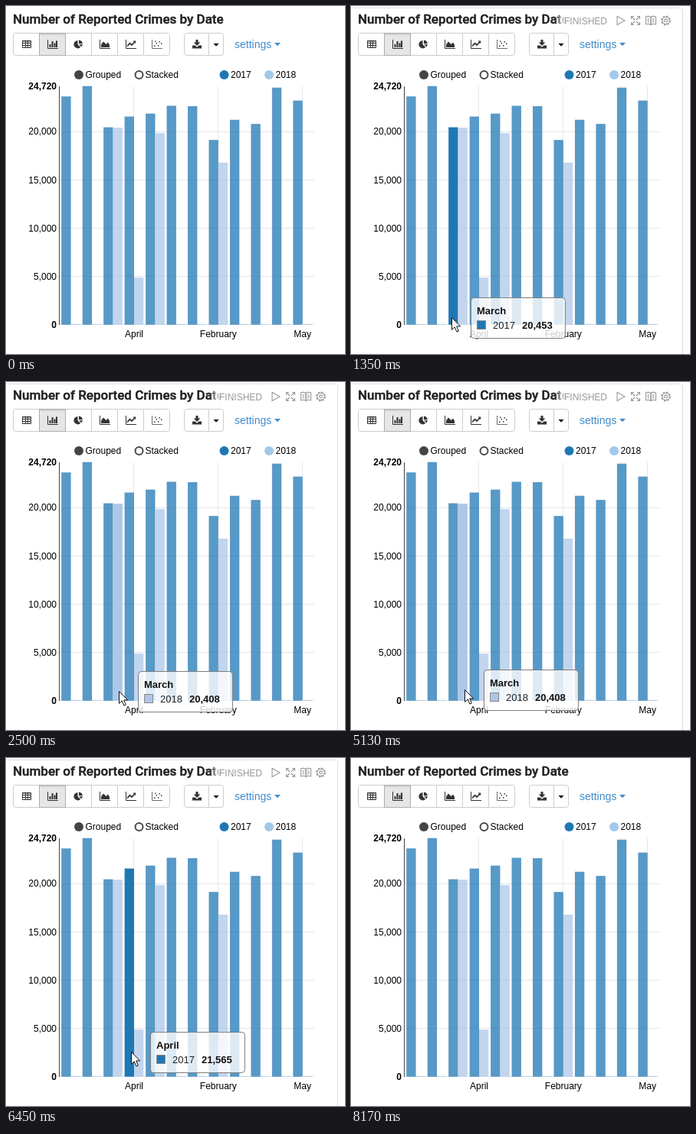
Recreate the animation shown at these times as an HTML page. Size 442 by 455 pixels, loop 9.11 s.

```html
<!DOCTYPE html>
<html lang="en">
<head>
<meta charset="utf-8">
<title>Crimes by date</title>
<style>
  html, body { margin: 0; width: 100%; height: 100%; overflow: hidden; background: #fff; }
  svg { display: block; width: 442px; height: 455px; }
  text { font: 12px "Liberation Sans", Arial, sans-serif; fill: #000; }
  .title { font: 500 17px Roboto, sans-serif; fill: #212121; stroke: #212121; stroke-width: .45px; }
  .link { font-size: 14px; fill: #428bca; }
  .status { fill: #999; }
  .end { text-anchor: end; }
  .mid { text-anchor: middle; }
  .bold { font-weight: bold; }
  #tip text { font-size: 13px; fill: #222; }
  #tip .bold { fill: #111; }
  .btn { fill: #fff; stroke: #ccc; }
  .dark { fill: #333; }
  .line { fill: none; stroke: #333; }
  .tool { fill: none; stroke: #999; stroke-width: 1.1; }
</style>
</head>
<body>
<svg viewBox="0 0 442 455">
  <defs>
    <linearGradient id="veil" gradientUnits="userSpaceOnUse" x1="265" y1="0" x2="280" y2="0">
      <stop offset="0" stop-color="#fff" stop-opacity="0"/>
      <stop offset="1" stop-color="#fff"/>
    </linearGradient>
    <path id="corner" d="M-5.5 -2V-5.5H-2M-5.5 -5.5L-1 -1"/>
    <path id="page" d="M0 -4.5Q3 -6.5 6.5 -5V5Q3 3.8 0 5.5ZM2 -2H4.5M2 0H4.5M2 2H4.5"/>
    <path id="axes" d="M.5 0V11.5H14"/>
  </defs>

  <path id="panel" d="M-5 2.5H429.5Q432.5 2.5 432.5 5.5V460" fill="none" stroke="#ddd"/>
  <text class="title" x="9" y="23">Number of Reported Crimes by Date</text>

  <g id="controls">
    <rect x="264" y="7" width="160" height="24" fill="url(#veil)"/>
    <text class="status" x="278" y="24">FINISHED</text>
    <g class="tool">
      <path d="M347 13.5V24.5L357 19Z"/>
      <g transform="translate(371 19)">
        <use href="#corner"/>
        <use href="#corner" transform="scale(-1 1)"/>
        <use href="#corner" transform="scale(1 -1)"/>
        <use href="#corner" transform="scale(-1)"/>
      </g>
      <g transform="translate(391 19)">
        <use href="#page"/>
        <use href="#page" transform="scale(-1 1)"/>
      </g>
      <g transform="translate(410.5 19)">
        <circle r="4.6"/>
        <circle r="1.9"/>
        <circle r="5.7" stroke-width="1.6" stroke-dasharray="2.2 2.277"/>
      </g>
    </g>
  </g>

  <rect class="btn" x="9.5" y="35.5" width="204" height="29" rx="3"/>
  <path class="btn" d="M111.5 36V64M145.5 36V64M179.5 36V64"/>
  <rect x="43.5" y="35.5" width="34" height="29" fill="#e6e6e6" stroke="#adadad"/>
  <path d="M44 37H77" stroke="#000" stroke-opacity=".1" stroke-width="2"/>
  <rect class="btn" x="232.5" y="35.5" width="51" height="29" rx="3"/>
  <path class="btn" d="M264.5 36V64"/>

  <path class="line" d="M21.5 45.5H32.5V54.5H21.5ZM21.5 46H32.5M21.5 48.5H32.5M21.5 51.5H32.5M25.5 46V54.5M28.5 46V54.5"/>
  <use href="#axes" class="line" x="54" y="44"/>
  <path class="dark" d="M56.5 50h2v4h-2zM59.5 46h2v8h-2zM62.5 48.5h2v5.5h-2zM65 45.5h2v8.5h-2z"/>
  <path class="dark" d="M93.5 45A5.2 5.2 0 1 0 97.2 54L93.5 50.2ZM95 44.5V49.3H99.8A4.9 4.9 0 0 0 95 44.5ZM95.3 50.3H99.8A5 5 0 0 1 98.3 53.5Z"/>
  <use href="#axes" class="line" x="122" y="44"/>
  <path class="dark" d="M124 54V50.5L127 46.5L130.5 50L133 47.5L135 51V54Z"/>
  <use href="#axes" class="line" x="156" y="44"/>
  <path class="line" stroke-width="1.7" d="M158 52.5L161.5 48.8L164 51L168 46.8"/>
  <path class="dark" d="M165.5 45.5H169.2V49.2Z"/>
  <use href="#axes" class="line" x="190" y="44" stroke-opacity=".7"/>
  <path class="line" stroke-width="1.5" d="M193 52.2h1.5M195.5 48.7H197M198 51.7h1.5M199.5 46.7H201M202 49.2h1.5M194 46.2h1.3"/>
  <path class="dark" d="M247.5 44H250.5V47.5H253.3L249 52L244.7 47.5H247.5ZM243 51.5H246.5L249 53.8L251.5 51.5H255V55.5H243Z"/>
  <path d="M270.5 49H277.5L274 52.7Z"/>
  <text class="link" x="298" y="55">settings</text>
  <path d="M350 48H358L354 52.3Z" fill="#428bca"/>

  <circle cx="95" cy="90" r="6" fill="#444"/>
  <text x="103.5" y="94">Grouped</text>
  <circle cx="173.5" cy="90" r="5" fill="#fff" stroke="#4d4448" stroke-width="2"/>
  <text x="181.5" y="94">Stacked</text>
  <circle cx="284.5" cy="90" r="6" fill="#1f77b4"/>
  <text x="293" y="94">2017</text>
  <circle cx="343" cy="90" r="6" fill="#a3c9ea"/>
  <text x="351.5" y="94">2018</text>

  <g id="chart"></g>

  <g id="tip">
    <rect x=".5" y=".5" rx="4" height="53" fill="#fff" fill-opacity=".8" stroke="#7d7d7d"/>
    <text class="bold" x="8" y="22"></text>
    <rect x="8.5" y="30.5" width="11" height="11" stroke="#888"/>
    <text x="29" y="41"></text>
    <text class="bold" x="67" y="41"></text>
  </g>
  <path id="cursor" d="M.5 .5V16.3L4.2 12.8L6.9 19L9.3 18L6.7 11.9H11.6Z" fill="#fff" stroke="#111"/>
</svg>

<script>
const LOOP = 9110, FRAME = 73, FADE = 150, LEAVE = 8020, CLEAR = 8170;
const COLORS = ['#1f77b4', '#aec7e8'];
const FULL = [23650, 24720, 20453, 21565, 21870, 22680, 22640, 19140, 21230, 20800, 24560, 23220];
const PARTIAL = { 2: 20408, 3: 4880, 4: 19850, 7: 16800 };
const SERIES = [FULL, FULL.map((_, i) => PARTIAL[i] || 0)];
const MONTHS = { 2: 'March', 3: 'April', 4: 'June', 7: 'February', 11: 'May' };

// Each move starts where the last one ended and takes n frames.
const ENTRY = { x: 100, y: 458 };
const MOVES = [
  { at: 490, n: 12, x: 131.5, y: 407 },
  { at: 1430, n: 2, x: 133, y: 404 },
  { at: 2280, n: 4, x: 147.5, y: 404 },
  { at: 5130, n: 5, x: 162, y: 383 },
  { at: 6450, n: 4, x: 177, y: 389 },
  { at: 7930, n: 1, x: 206, y: 412 }
];

const $ = id => document.getElementById(id);
const chart = $('chart'), tip = $('tip'), cursor = $('cursor');
const [box, name, swatch, year, count] = tip.children;

function add(tag, attrs, label) {
  const el = document.createElementNS('http://www.w3.org/2000/svg', tag);
  for (const key in attrs) el.setAttribute(key, attrs[key]);
  if (label) el.textContent = label;
  return chart.appendChild(el);
}

const LEFT = 69.5, RIGHT = 401.5, BASE = 416.7, TOP = 24720;
const BAND = 27.46, BAR = BAND * .45;
const yOf = v => BASE - v * 312 / TOP;
const xOf = i => LEFT + (i + .1) * BAND;
const format = v => v.toLocaleString('en-US');

for (let v = 0; v <= 20000; v += 5000) {
  const y = Math.floor(yOf(v)) + .5;
  add('path', { d: `M${LEFT} ${y}H${RIGHT}`, stroke: '#e5e5e5' });
}
for (let i = 3; i < 12; i += 4) {
  const x = xOf(i) + BAR;
  add('path', { d: `M${Math.floor(x) + .5} 105V417`, stroke: '#e8e8e8' });
  add('text', { x, y: 433, class: 'mid' }, MONTHS[i]);
}
for (const v of [0, 5000, 10000, 15000, 20000, TOP]) {
  const edge = v === 0 || v === TOP;
  add('text', { x: 66, y: yOf(v) + 4.2, class: edge ? 'end bold' : 'end' }, format(v));
}

// Bars are numbered month * 2 + series.
const bars = [];
SERIES.forEach((row, s) => row.forEach((v, i) => {
  const height = Math.max(1, BASE - yOf(v));
  bars[i * 2 + s] = add('rect', {
    x: xOf(i) + s * BAR, y: BASE - height, width: BAR, height, fill: COLORS[s]
  });
}));
add('path', { d: 'M69.5 105V417', stroke: '#444' });

function barAt(x, y) {
  const i = Math.floor((x - xOf(0)) / BAND);
  const s = Math.floor((x - xOf(i)) / BAR);
  const hit = i >= 0 && s < 2 && y < BASE && y > yOf(SERIES[s][i]);
  return hit ? i * 2 + s : -1;
}

const ease = p => p < .5 ? 2 * p * p : 1 - 2 * (1 - p) ** 2;
const steps = [], spans = [];

// The last hovered bar stays active while the pointer crosses a gap.
function buildSteps() {
  let from = ENTRY, bar = -1;
  for (const to of MOVES) {
    for (let k = 0; k < to.n; k++) {
      const p = ease((k + 1) / to.n), t = to.at + k * FRAME;
      const x = from.x + (to.x - from.x) * p;
      const y = from.y + (to.y - from.y) * p;
      const hit = barAt(x, y);
      if (hit >= 0 && hit !== bar) {
        if (spans.length) spans[spans.length - 1].end = t;
        spans.push({ bar: hit, start: t, end: LEAVE });
        bar = hit;
      }
      steps.push({ t, x, y, bar });
    }
    from = to;
  }
}
buildSteps();

const ramp = x => Math.min(1, Math.max(0, x / FADE));
const show = (el, on) => el.style.display = on ? '' : 'none';
const place = (el, x, y) =>
  el.setAttribute('transform', `translate(${Math.floor(x)} ${Math.round(y)})`);

function drawTip({ x, y, bar }) {
  const s = bar % 2, i = bar >> 1, label = format(SERIES[s][i]);
  place(tip, x + 25, y - 26);
  box.setAttribute('width', 79.5 + label.length * 7.23);
  name.textContent = MONTHS[i];
  swatch.setAttribute('fill', COLORS[s]);
  year.textContent = 2017 + s;
  count.textContent = label;
}

function draw(t) {
  const step = steps.filter(s => s.t <= t).pop();
  const inside = Boolean(step) && t < LEAVE;
  for (const el of [$('panel'), $('controls'), cursor]) show(el, inside);

  const glow = bars.map(() => 0);
  if (inside) {
    for (const { bar, start, end } of spans) glow[bar] += ramp(t - start) - ramp(t - end);
  }
  bars.forEach((el, i) => el.setAttribute('fill-opacity', .75 + .25 * glow[i]));

  const hovering = Boolean(step) && step.bar >= 0 && t < CLEAR;
  show(tip, hovering);
  if (hovering) drawTip(step);
  if (inside) place(cursor, step.x, step.y);
}

const begin = performance.now();
function tick() {
  draw((performance.now() - begin) % LOOP);
  requestAnimationFrame(tick);
}
tick();
</script>
</body>
</html>
```
